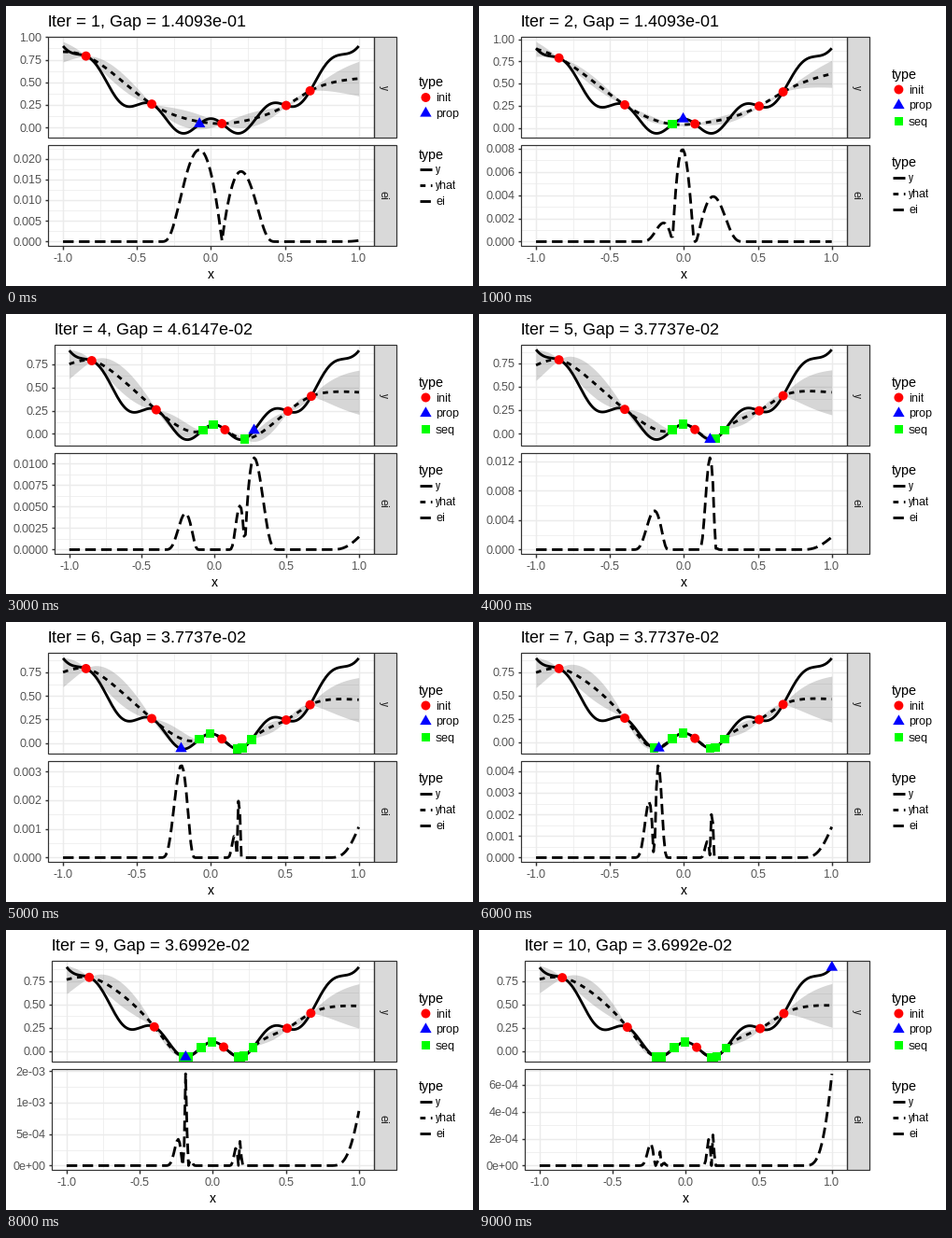
These frames come from a looping animation (500x300 px, 10000 ms). A matplotlib script:

```python
import math

import matplotlib.pyplot as plt
import numpy as np
from matplotlib.animation import FuncAnimation
from matplotlib.patches import Circle, Polygon, Rectangle

plt.rcParams.update({
    "font.family": "Liberation Sans",
    "text.hinting": "default",
    "text.hinting_factor": 1,
})

W, H = 500, 300
PT = 0.72                       # points per pixel at 100 dpi
RIGHT, STRIP = 393.5, 418
TOP_PANEL, LOW_PANEL = (33.2, 141.4), (149.1, 257.4)
GREY20, GREY30, GREY85, GREY92 = "#333333", "#4d4d4d", "#d9d9d9", "#ebebeb"
LINE = 2.84
KEY = 17

INIT = [-0.845, -0.400, 0.0745, 0.509, 0.671]
PROPOSED = [-0.07726, -0.005, 0.2112, 0.275, 0.1772,
            -0.2015, -0.1695, 0.1893, -0.1854, 1.0]
GAPS = ["1.4093e-01"] * 2 + ["4.6147e-02"] * 2 + ["3.7737e-02"] * 3 \
    + ["3.7242e-02"] + ["3.6992e-02"] * 2
# left panel edge, tick step and label format of the lower axis
AXES = [(45.25, 5e-3, ".3f"), (45.25, 2e-3, ".3f"), (38.25, 1e-2, ".2f"),
        (52.25, 2.5e-3, ".4f"), (45.25, 4e-3, ".3f"), (45.25, 1e-3, ".3f"),
        (45.25, 1e-3, ".3f"), (52.25, 5e-4, ".4f"), (49.25, 5e-4, ".0e"),
        (49.25, 2e-4, ".0e")]

GRID = np.linspace(-1, 1, 200)
erf = np.vectorize(math.erf)


def objective(x):
    return x ** 2 + 0.1 * np.cos(5 * np.pi * x)


def matern(a, b, theta):
    h = math.sqrt(3) * np.abs(a[:, None] - b[None, :]) / theta
    return (1 + h) * np.exp(-h)


def fit(x, y, theta):
    """Profile likelihood of a constant-mean Gaussian process."""
    chol = np.linalg.cholesky(matern(x, x, theta) + 1e-10 * np.eye(len(x)))
    one = np.linalg.solve(chol, np.ones(len(x)))
    yy = np.linalg.solve(chol, y)
    mean = one @ yy / (one @ one)
    z = yy - mean * one
    var = z @ z / len(x)
    loss = len(x) * math.log(var) + 2 * np.log(np.diag(chol)).sum()
    return loss, mean, var, chol, z


def model(x):
    """Prediction, standard error and expected improvement on the grid."""
    y = objective(x)
    thetas = np.geomspace(0.03, 2 * np.ptp(x), 500)
    theta = min(thetas, key=lambda t: fit(x, y, t)[0])
    _, mean, var, chol, z = fit(x, y, theta)
    v = np.linalg.solve(chol, matern(x, GRID, theta))
    mu = mean + v.T @ z
    se = np.sqrt(np.maximum(var * (1 - (v ** 2).sum(0)), 1e-14))
    d = y.min() - mu
    u = d / se
    ei = d * (1 + erf(u / math.sqrt(2))) / 2 \
        + se * np.exp(-u ** 2 / 2) / math.sqrt(2 * np.pi)
    return mu, se, np.where(se < 1e-6, 0, np.maximum(ei, 0))


STEPS = [model(np.array(INIT + PROPOSED[:i])) for i in range(10)]

fig = plt.figure(figsize=(W / 100, H / 100), dpi=100, facecolor="white")
ax = fig.add_axes([0, 0, 1, 1])


def text(x, y, s, size, color="black", **kw):
    kw.setdefault("va", "baseline")
    ax.text(x, y, s, fontsize=size * PT, color=color, zorder=9, **kw)


def line(x, y, width, color="black", dash="-", z=4):
    ax.plot(x, y, lw=width * PT, color=color, ls=dash, zorder=z,
            solid_capstyle="butt", dash_capstyle="butt",
            solid_joinstyle="round", dash_joinstyle="round")


def box(x0, y0, x1, y1, z, **kw):
    ax.add_patch(Rectangle((x0, y0), x1 - x0, y1 - y0, zorder=z, **kw))


def marker(kind, x, y):
    if kind == "init":
        shape = Circle((x, y), 4.95, fc="#ff0000", lw=0, zorder=6)
    elif kind == "prop":
        shape = Polygon([(x, y - 7.2), (x + 6.2, y + 3.6), (x - 6.2, y + 3.6)],
                        fc="#0000ff", lw=0, zorder=8)
    else:
        shape = Rectangle((x - 4.8, y - 4.8), 9.6, 9.6,
                          fc="#00ff00", lw=0, zorder=7)
    ax.add_patch(shape)


def scale(lo, hi, start, end):
    """Map data to pixels with a 5 % margin on both sides."""
    pad = 0.05 * (hi - lo)
    lo, hi = lo - pad, hi + pad
    return lo, hi, lambda v: start + (np.asarray(v) - lo) / (hi - lo) * (end - start)


def ticks(lo, hi, step):
    return np.arange(math.ceil(lo / step), math.floor(hi / step) + 1) * step


def panel(left, top, bottom, ys, step, fmt, px, name):
    lo, hi, py = ys
    major = ticks(lo, hi, step)
    for v in ticks(lo, hi, step / 2):
        wide = np.abs(major - v).min() < step / 10
        line([left, RIGHT], [py(v)] * 2, 1.42 if wide else 0.71, GREY92, z=1)
    for v in np.arange(-4, 5) / 4:
        wide = v * 2 == int(v * 2)
        line([px(v)] * 2, [top, bottom], 1.42 if wide else 0.71, GREY92, z=1)
    for v in major:
        line([left - 3.75, left], [py(v)] * 2, 1.42, GREY20)
        text(left - 6.75, round(float(py(v)) + 4.3), format(abs(v), fmt), 12,
             GREY30, ha="right")
    box(RIGHT, top, STRIP, bottom, 3, fc=GREY85, ec=GREY20, lw=1.2 * PT)
    box(left, top, RIGHT, bottom, 5, fc="none", ec=GREY20, lw=1.2 * PT)
    text((RIGHT + STRIP) / 2 - 1.5, (top + bottom) / 2, name, 12, "#1a1a1a",
         rotation=270, ha="center", va="center")


def legends(kinds):
    shift = KEY / 2 * (len(kinds) - 2)
    y = 98 - shift
    text(442, round(86 - shift), "type", 15)
    for i, kind in enumerate(kinds):
        marker(kind, 449.4, y + i * KEY)
        text(460, round(y + i * KEY + 4), kind, 12)
    y = 175.4 + shift
    text(442, round(163.5 + shift), "type", 15)
    for i, (name, dash) in enumerate(
            [("y", "-"), ("yhat", (0, (2, 2))), ("ei", (0, (4, 2)))]):
        line([442.6, 456.4], [y + i * KEY] * 2, LINE, dash=dash)
        text(460, round(y + i * KEY + 4), name, 12)


def draw(i):
    ax.clear()
    ax.set(xlim=(0, W), ylim=(H, 0))
    ax.axis("off")
    mu, se, ei = STEPS[i]
    left, step, fmt = AXES[i]
    true = objective(GRID)
    px = scale(-1, 1, left, RIGHT)[2]
    ys = scale(min(true.min(), (mu - se).min()),
               max(true.max(), (mu + se).max()), *TOP_PANEL[::-1])
    es = scale(0, ei.max(), *LOW_PANEL[::-1])
    panel(left, *TOP_PANEL, ys, 0.25, ".2f", px, "y")
    panel(left, *LOW_PANEL, es, step, fmt, px, "ei")

    x, py = px(GRID), ys[2]
    ax.fill_between(x, py(mu - se), py(mu + se), color=GREY20, alpha=0.2,
                    lw=0, zorder=2)
    line(x, py(true), LINE)
    line(x, py(mu), LINE, dash=(0, (2, 2)))
    line(x, es[2](ei), LINE, dash=(0, (4, 2)))

    points = [("init", v) for v in INIT] + [("seq", v) for v in PROPOSED[:i]]
    for kind, v in points + [("prop", PROPOSED[i])]:
        marker(kind, px(v), py(objective(v)))

    for v in (-1, -0.5, 0, 0.5, 1):
        line([px(v)] * 2, [LOW_PANEL[1], LOW_PANEL[1] + 3.75], 1.42, GREY20)
        text(px(v), 274, f"{v:.1f}", 12, GREY30, ha="center")
    text((left + RIGHT) / 2, 292, "x", 15, ha="center")
    text(left, 22, f"Iter = {i + 1}, Gap = {GAPS[i]}", 18)
    legends(["init", "prop"] + ["seq"] * (i > 0))
    return []


anim = FuncAnimation(fig, draw, frames=10, init_func=lambda: [],
                     interval=1000, repeat=True, repeat_delay=0, blit=False)
plt.show()
```
